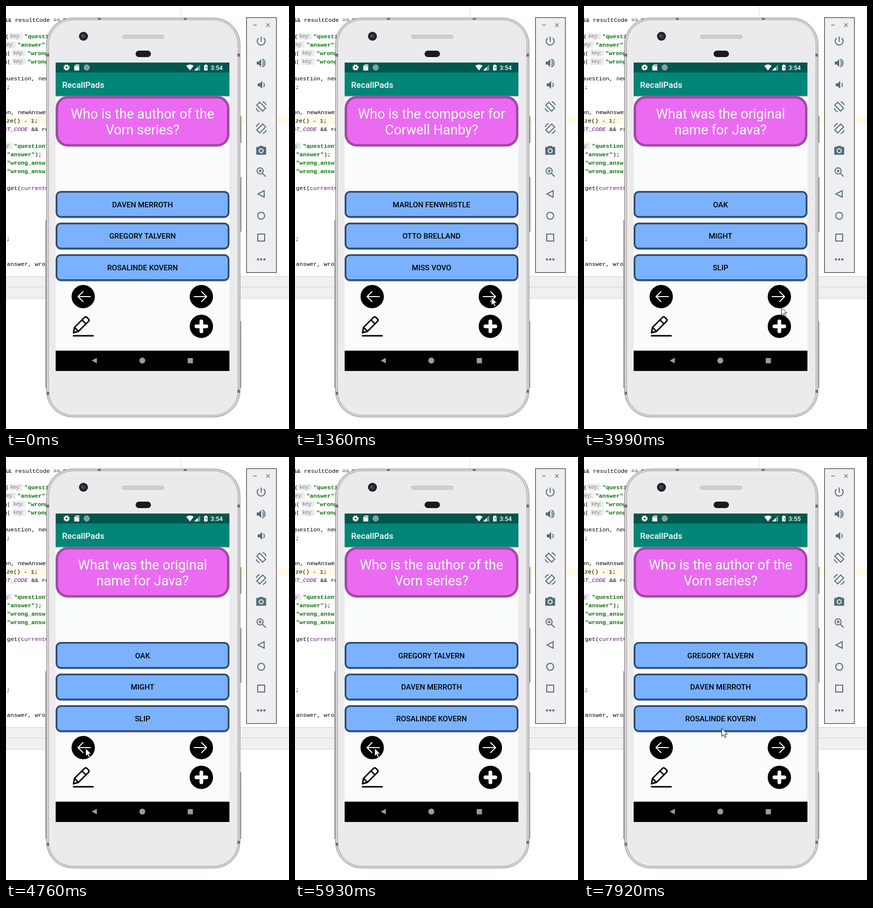
An HTML page that plays this animation: 570x853 px, repeating every 8000 ms.

```html
<!DOCTYPE html>
<html lang="en">
<head>
<meta charset="utf-8">
<title>Quiz app demo</title>
<style>
html, body { margin: 0; width: 100%; height: 100%; overflow: hidden; background: #fff; }
svg { display: block; }
text { white-space: pre; }
.code { font: 11.7px "Liberation Mono", monospace; }
.str { fill: #087008; font-weight: bold; }
.field { fill: #660e7a; }
.const { fill: #660e7a; font-style: italic; }
.hint { font: 11px "Open Sans", sans-serif; fill: #7d7d7d; }
.ui { font-family: Roboto, sans-serif; font-weight: 500; }
.mid { text-anchor: middle; }
.question { font: 400 27.2px Roboto, sans-serif; fill: #fff; }
.answer { font-size: 15.1px; }
.line { fill: none; stroke: currentColor; stroke-width: 2; }
.round { stroke-linecap: round; stroke-linejoin: round; }
</style>
</head>
<body>
<svg width="570" height="853" viewBox="0 0 570 853">
  <rect width="570" height="853" fill="#fff"/>
  <path d="M352.5 0V24" stroke="#d8d8d8"/>
  <rect y="223" width="570" height="16" fill="#fffae3"/>
  <rect y="545" width="570" height="45" fill="#f0f0f0"/>
  <path d="M0 545.5H570M0 566.5H570M0 589.5H570" stroke="#d0d0d0"/>
  <g id="code" class="code"></g>

  <!-- phone -->
  <path d="M473 222V276M473 345V455M472.500 635V770M80.500 432V770" stroke="#aaa4a6" stroke-width="3"/>
  <rect x="81.500" y="24" width="390" height="805" rx="53" fill="#d5d0d2" stroke="#918b8d"/>
  <rect x="86" y="28" width="381" height="797" rx="49" fill="#ebebee" stroke="#aaa5a7"/>
  <path d="M82 99h5M466 99h5M82 781h5M466 777h5M188 24v4M361 24v4" stroke="#777174" stroke-width="6"/>
  <circle cx="156" cy="61" r="9" fill="#211f22"/>
  <circle cx="156" cy="61" r="5" fill="#353947"/>
  <circle cx="154" cy="60" r="2" fill="#80504d"/>
  <rect x="234.500" y="58.500" width="84" height="7" rx="3.500" fill="#d1cfd2" stroke="#bcb8bb"/>
  <rect x="261" y="90" width="31" height="13" rx="6.500" fill="#1c1a1c"/>

  <!-- screen -->
  <rect x="100" y="114" width="350" height="622" fill="#fafcfb"/>
  <rect x="100" y="181" width="350" height="2" fill="#c9cfcd"/>
  <rect x="100" y="134" width="350" height="47.500" fill="#008577"/>
  <rect x="100" y="114" width="350" height="20" fill="#00574b"/>
  <text class="ui" x="113" y="164.500" font-size="17" fill="#fff">RecallPads</text>
  <g fill="#fff">
    <circle cx="122" cy="124" r="3.500" fill="none" stroke="#fff" stroke-width="3"/>
    <circle cx="122" cy="124" r="5.300" fill="none" stroke="#fff" stroke-width="2" stroke-dasharray="2.200 1.963"/>
    <path d="M137.500 121.500L141 118h6.500v12h-10z"/>
    <path d="M142 119.500v2.500M144 119.500v2.500M146 119.500v2.500" stroke="#00574b"/>
    <circle cx="162.500" cy="124" r="5.500" fill="#7b9fa4" stroke="#a9bfc2"/>
    <path d="M363 120.500q7.500-5 15 0l-7.500 9.500z"/>
    <path d="M391 118v12h-12z" fill="#6d9b95"/>
    <path d="M386 123v7h-7z"/>
    <path d="M399 119.500h2v-1.500h3v1.500h2V130h-7z"/>
    <path d="M403.500 120.500l-2 4h2l-1 4 2.500-5h-2z" fill="#00574b"/>
  </g>
  <text id="clock" class="ui" x="412" y="128.500" font-size="12.500" fill="#fff"></text>
  <rect id="card" x="102.500" y="184" width="345" rx="22" fill="#ea6bf2" stroke="#a248a6" stroke-width="5"/>
  <g id="question" class="question mid"><text x="275" y="227"></text><text x="275" y="259"></text></g>
  <g id="answers"></g>

  <circle cx="155.500" cy="586" r="23.500"/>
  <circle cx="393.500" cy="586" r="23.500"/>
  <circle cx="393.500" cy="646" r="23.500"/>
  <g class="line round" style="color:#fff">
    <path d="M170 586H145M155 576L145 586L155 596M379 586H404M394 576L404 586L394 596"/>
    <path d="M393.500 636v20M383.500 646h20" stroke-width="7.500" style="stroke-width:7.500"/>
  </g>
  <path class="line round" style="stroke-width:3" d="M136 665H175.500M136 659L138 648L158 628Q160.500 625.500 163 628L166 631Q168.500 633.500 166 636L146 656ZM153 633L161 641M138.500 648.500L146 656"/>

  <rect x="100" y="695" width="350" height="41"/>
  <g fill="#9b9b9b">
    <path d="M183 709.500v11l-10.500-5.500z"/>
    <circle cx="274.500" cy="715" r="6"/>
    <rect x="366" y="710" width="10.500" height="10.500"/>
  </g>

  <!-- emulator tools -->
  <rect x="484.500" y="23.500" width="60" height="514" fill="#efeff1" stroke="#151515"/>
  <path d="M498 38.500h7M524 35l7 7M531 35l-7 7" stroke="#68727a" stroke-width="1.300"/>
  <g id="tools" fill="#546e7a" style="color:#546e7a"></g>

  <circle id="press" r="12" fill="#e6e100" fill-opacity=".7"/>
  <path id="pointer" d="M.5 .5V16.500L4.200 13L6.700 18.800L9.200 17.700L6.700 12H11.700Z" fill="#fff" stroke="#111"/>
</svg>
<script>
const $ = id => document.getElementById(id);

// --- code behind the phone: baseline, x, text, class
const code = [
  [32, -3, "&& resultCode =="], [32, 114, "RESULT_OK", "const"],
  [65, -1, "("], [65, 37, '"question"', "str"],
  [82, 23, '"answer"', "str"], [82, 79, ")"],
  [99, -5, "g("], [99, 43, '"wrong', "str"],
  [116, -5, "g("], [116, 43, '"wrong', "str"],
  [150, -5, "Question, new"], [167, 1, ";"],
  [218, -4, "on, newAnswer"], [235, -13, "size() - 1;"],
  [252, -5, "ST_CODE", "const"], [252, 51, "&& re"],
  [286, 16, '"question"', "str"],
  [303, 2, '"answer"', "str"], [303, 58, ");"],
  [320, 2, '"wrong_answ', "str"], [337, 2, '"wrong_answ', "str"],
  [371, 2, "get("], [371, 30, "currentCard", "field"],
  [473, 1, ";"], [524, 2, "answer, wrong"]
];
const hints = [[6, 65], [-8, 82], [12, 99], [12, 116], [-15, 286]];
$("code").innerHTML =
  code.map(([y, x, s, c = ""]) =>
    `<text x="${x}" y="${y}" class="${c}">${s.replace(/&/g, "&amp;")}</text>`).join("") +
  hints.map(([x, y]) =>
    `<rect x="${x}" y="${y - 11}" width="28" height="14" rx="3" fill="#ededed"/>
     <text class="hint" x="${x + 3}" y="${y - 1}">key:</text>`).join("");

// --- toolbar icons on a 24 unit grid
const line = d => `<path class="line" d="${d}"/>`;
const speaker = '<path d="M3 9v6h4l5 5V4L7 9z"/>' + line("M14.500 8a5 5 0 0 1 0 8");
const rotate = line("M9 3L21 15L15 21L3 9ZM2 15a10 10 0 0 0 7 7M22 9a10 10 0 0 0-7-7");
const tools = [
  line("M12 2.500V13M7 5.500a8 8 0 1 0 10 0"),
  speaker + line("M14 4.200a8.200 8.200 0 0 1 0 15.600"),
  `<g transform="translate(2)">${speaker}</g>`,
  `<g transform="matrix(-1 0 0 1 24 0)">${rotate.replace("M9 3L21 15L15 21L3 9Z", "M15 3L3 15L9 21L21 9Z").replace(/M2 15.*"/, 'M9 2a10 10 0 0 0-7 7M15 22a10 10 0 0 0 7-7"')}</g>`,
  `<g transform="matrix(-1 0 0 1 24 0)">${rotate}</g>`,
  '<path d="M9 3L7 5H3.500Q2 5 2 6.500V19.500Q2 21 3.500 21H20.500Q22 21 22 19.500V6.500Q22 5 20.500 5H17L15 3Z"/><circle cx="12" cy="13" r="4" fill="none" stroke="#efeff1" stroke-width="2"/>',
  line("M16 9.500a6.200 6.200 0 1 0-12.400 0a6.200 6.200 0 1 0 12.400 0M14.500 14.500L21 21M7 9.500h6M9.800 6.500v6"),
  line("M18 5.500V18.500L5.500 12Z"),
  line("M19 12a7 7 0 1 0-14 0a7 7 0 1 0 14 0"),
  line("M5 5H19V19H5Z"),
  [5.500, 12, 18.500].map(x => `<circle cx="${x}" cy="12" r="2.200"/>`).join("")
];
$("tools").innerHTML = tools.map((icon, i) =>
  `<g transform="translate(502 ${59 + 44 * i})">${icon}</g>`).join("");

// --- answer buttons
$("answers").innerHTML = [0, 1, 2].map(i => `<g transform="translate(0 ${373 + 63.8 * i})">
  <rect class="shade" x="101" y="1.500" width="348" height="54" rx="10" fill="#000" fill-opacity=".22"/>
  <rect x="101.750" y="1.750" width="346.500" height="50.500" rx="8.500" fill="#7ab2ff" stroke="#30496f" stroke-width="3.500"/>
  <text class="ui answer mid" x="275" y="32.700"></text></g>`).join("");
const labels = document.querySelectorAll(".answer");
const shades = document.querySelectorAll(".shade");
const lines = $("question").children;

const author = ["Who is the author of the", "Vorn series?"];
const composer = ["Who is the composer for", "Corwell Hanby?"];
const person = ["Who is Ned Barvok?"];
const java = ["What was the original", "name for Java?"];
const [A, B, C] = ["DAVEN MERROTH", "GREGORY TALVERN", "ROSALINDE KOVERN"];
const [D, E, F] = ["MARLON FENWHISTLE", "OTTO BRELLAND", "MISS VOVO"];
const [G, H, I] = ["RING MASTER", "WRITER FOR ZENTOLIA.", "PROFESSIONAL RODEO CLOWN"];
const cards = [
  [0, author, [A, B, C]],
  [1360, composer, [D, E, F]],
  [2370, person, [G, H, I]],
  [3610, java, ["OAK", "MIGHT", "SLIP"]],
  [4920, person, [G, I, H]],
  [5450, composer, [E, D, F]],
  [5930, author, [B, A, C]]
];
const presses = [[1210, 1290], [2300, 2370], [3530, 3610], [4840, 4920],
  [5300, 5380], [5850, 5930], [7230, 7310]];

// --- pointer moves: first step, last step, step count, way points
const moves = [
  [70, 360, 5, [[522, 899], [356, 629]]],
  [740, 1060, 5, [[356, 629], [378, 606], [395, 587]]],
  [3990, 4760, 11, [[395, 587], [401, 643], [330, 635], [210, 600], [160, 587]]],
  [6380, 7150, 11, [[160, 587], [200, 597], [300, 575], [339, 515], [306, 475]]],
  [7310, 7920, 9, [[306, 475], [301, 560], [288, 637], [280, 610], [277, 547]]]
];

function along(points, u) {
  const s = u * (points.length - 1);
  const i = Math.min(Math.floor(s), points.length - 2);
  const [p, q] = [points[i], points[i + 1]];
  return p.map((v, k) => Math.round(v + (q[k] - v) * (s - i)));
}

function pointerAt(t) {
  const move = moves.findLast(m => t >= m[0]);
  if (!move) return [600, 900];
  const [start, end, steps, points] = move;
  const done = Math.floor((t - start) / (end - start) * (steps - 1) + 1e-6) + 1;
  return along(points, Math.min(done / steps, 1));
}

let shown;
function showCard(card) {
  if (card === shown) return;
  shown = card;
  const [, question, answers] = card;
  $("card").setAttribute("height", question.length > 1 ? 97 : 64.5);
  for (let i = 0; i < 2; i++) lines[i].textContent = question[i] || "";
  answers.forEach((s, i) => labels[i].textContent = s);
}

function draw(t) {
  showCard(cards.findLast(c => t >= c[0]));
  const place = `translate(${pointerAt(t).join(" ")})`;
  $("pointer").setAttribute("transform", place);
  $("press").setAttribute("transform", place);
  $("press").style.display = presses.some(([a, b]) => t >= a && t < b) ? "" : "none";
  $("clock").textContent = t < 7690 ? "3:54" : "3:55";
  shades[1].setAttribute("y", t >= 7310 && t < 7460 ? 3 : 1.5);
}

const begin = performance.now();
function tick() {
  draw((performance.now() - begin) % 8000);
  requestAnimationFrame(tick);
}
tick();
</script>
</body>
</html>
```
